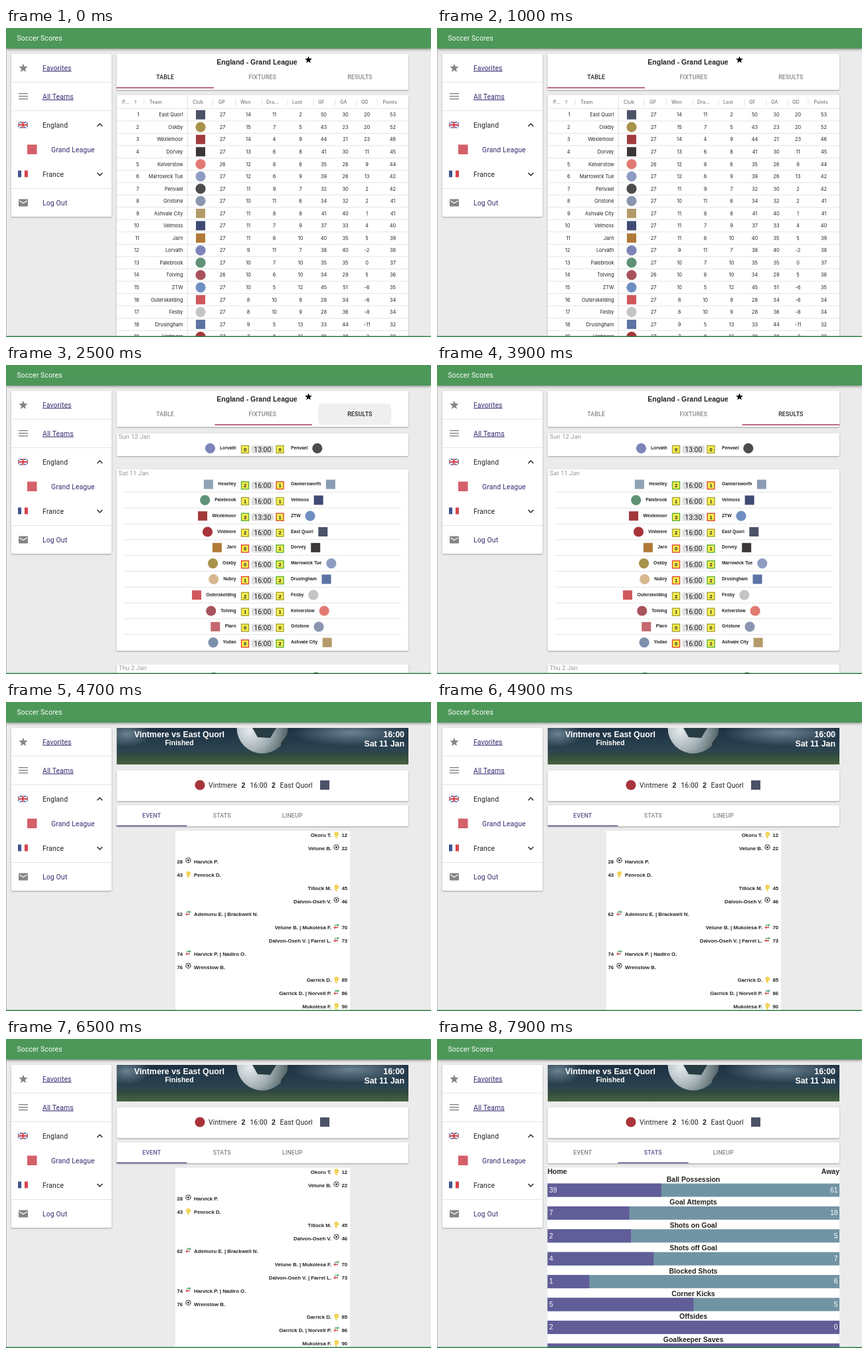
Recreate the animation shown at these times as an HTML page. Size 640 by 465 pixels, loop 8000 ms.

```html
<!DOCTYPE html>
<html lang="en">
<head>
<meta charset="utf-8">
<title>Soccer Scores</title>
<style>
  html, body { margin: 0; width: 100%; height: 100%; overflow: hidden; background: #ebebeb; }
  svg { display: block; width: 640px; height: 465px; }
  text { font: 10.4px Roboto, sans-serif; fill: #222; white-space: pre; }
  .card { fill: #fff; filter: drop-shadow(0 1px 1.2px rgba(0, 0, 0, .32)); }
  .menu { letter-spacing: .14px; }
  .link { fill: #352a70; }
  .under { text-decoration: underline; }
  .tab { font: 500 8.8px Roboto, sans-serif; letter-spacing: .22px; fill: #858585; }
  .cell { font: 7.4px Inter, sans-serif; }
  .head { font: 500 7.2px Inter, sans-serif; fill: #777; }
  .date { font-size: 9.6px; fill: #999; }
  .bold { font: bold 10.5px "Liberation Sans", Arial, sans-serif; }
  .team { font-size: 6.7px; }
  .score { font-size: 7.6px; }
  .event { font-size: 7.8px; }
  .banner { font-size: 12.4px; fill: #fff; }
  .num { font: 10.4px "Liberation Sans", Arial, sans-serif; fill: #fff; }
  .mid { text-anchor: middle; }
  .end { text-anchor: end; }
  .rule { stroke: #dedede; stroke-width: .8; }
  .icon { fill: #858585; }
  .chev { fill: none; stroke: #222; stroke-width: 1.4; }
</style>
</head>
<body>
<svg id="stage" viewBox="0 0 640 465"></svg>
<script>
const LOOP = 8000;
const LEAGUE = "Grand League";

// name, crest colour, square crest
const clubs = [
  ["East Quorl", "#4a5268", 1], ["Oskby", "#a8924a"], ["Wexlemoor", "#a23a3c", 1],
  ["Dorvey", "#3a3637", 1], ["Kelverstow", "#e27a72"], ["Marrowick Tue", "#8e9cc4"],
  ["Penvael", "#4c4c4c"], ["Gristone", "#8a96b0"], ["Ashvale City", "#b59a6a", 1],
  ["Velmoss", "#3f4a74", 1], ["Jarn", "#b07a38", 1], ["Lorvath", "#7d84b8"],
  ["Palebrook", "#5f9276"], ["Tolving", "#a8525c"], ["ZTW", "#6f8fc0"],
  ["Outerskelding", "#d0585c", 1], ["Fesby", "#c4c4c4"], ["Drusingham", "#5c74a4", 1],
  ["Vintmere", "#a8343a"], ["Hexelley", "#8fa3b4", 1], ["Gannersworth", "#8a9cb4", 1],
  ["Nubry", "#d8b890"], ["Plarn", "#c4686e", 1], ["Yodan", "#7c90ac"]
];

// played, won, drawn, lost, for, against, difference, points
const table = `27 14 11 2 50 30 20 53|27 15 7 5 43 23 20 52|27 14 4 9 44 21 23 46
27 13 6 8 41 30 11 45|26 12 8 6 35 26 9 44|27 12 6 9 39 26 13 42|27 11 9 7 32 30 2 42
27 10 11 6 34 32 2 41|27 11 8 8 41 40 1 41|27 11 7 9 37 33 4 40|27 11 6 10 40 35 5 39
27 9 11 7 38 40 -2 38|27 10 7 10 35 35 0 37|26 10 6 10 34 29 5 36|27 10 5 12 45 51 -6 35
27 8 10 9 28 34 -6 34|27 8 10 9 28 36 -8 34|27 9 5 13 33 44 -11 32|27 7 8 12 36 38 -2 30`
  .split(/[|\n]/).map(r => r.split(" "));

// home club, away club, goals, goals, time
const sunday = [[11, 6, 0, 0, "13:00"]];
const saturday = [
  [19, 20, 2, 1], [12, 9, 1, 1], [2, 14, 3, 1, "13:30"], [18, 0, 2, 2], [10, 3, 0, 1], [1, 5, 0, 2],
  [21, 17, 1, 2], [15, 16, 2, 2], [13, 4, 1, 1], [22, 7, 0, 0], [23, 8, 0, 2]
];

// minute, kind, player, side
const events = [
  [12, "card", "Okoru T.", 1], [22, "goal", "Velune B.", 1], [28, "goal", "Harvick P.", 0],
  [43, "card", "Penrock D.", 0], [45, "card", "Tillock M.", 1], [46, "goal", "Dalvon-Oseh V.", 1],
  [62, "swap", "Ademoru E. | Brackwell N.", 0], [70, "swap", "Velune B. | Mukolesa F.", 1],
  [73, "swap", "Dalvon-Oseh V. | Farrel L.", 1], [74, "swap", "Harvick P. | Nadiro O.", 0],
  [76, "goal", "Wrenstow B.", 0], [85, "card", "Garrick D.", 1],
  [86, "swap", "Garrick D. | Norvell P.", 1], [90, "card", "Mukolesa F.", 1]
];

const stats = [
  ["Ball Possession", 39, 61], ["Goal Attempts", 7, 18], ["Shots on Goal", 2, 5],
  ["Shots off Goal", 4, 7], ["Blocked Shots", 1, 6], ["Corner Kicks", 5, 5],
  ["Offsides", 2, 0], ["Goalkeeper Saves", 3, 0]
];

const text = (x, y, s, cls = "") => `<text x="${x}" y="${y}" class="${cls}">${s}</text>`;
const rect = (x, y, w, h, attrs = "") => `<rect x="${x}" y="${y}" width="${w}" height="${h}" ${attrs}/>`;
const circle = (x, y, r, attrs = "") => `<circle cx="${x}" cy="${y}" r="${r}" ${attrs}/>`;
const path = (d, attrs = "") => `<path d="${d}" ${attrs}/>`;
const line = (x1, y1, x2, y2) => `<line x1="${x1}" y1="${y1}" x2="${x2}" y2="${y2}" class="rule"/>`;
const card = (y, h, x = 166.5, w = 439.5) => rect(x, y, w, h, 'class="card" rx="2"');
const each = (list, f) => list.map(f).join("");

function crest(x, y, club) {
  const [, color, square] = clubs[club];
  return square ? rect(x - 7, y - 7, 14, 14, `fill="${color}"`) : circle(x, y, 7.6, `fill="${color}"`);
}

function star(x, y, r, attrs) {
  const pts = Array.from({ length: 10 }, (_, i) => {
    const a = i * Math.PI / 5, d = i % 2 ? r * .42 : r;
    return (x + d * Math.sin(a)).toFixed(2) + "," + (y - d * Math.cos(a)).toFixed(2);
  });
  return `<polygon points="${pts.join(" ")}" ${attrs}/>`;
}

const pen = document.createElement("canvas").getContext("2d");
pen.font = 'bold 6.7px "Liberation Sans", Arial, sans-serif';
const nameWidth = s => pen.measureText(s).width;

function appBar() {
  return rect(0, -6, 640, 37, 'fill="#4d9859" style="filter:drop-shadow(0 1px 2px rgba(0,0,0,.45))"')
    + text(16.5, 18.6, "Soccer Scores", "menu").replace("<text", '<text style="fill:#fff"');
}

function flagUK(x, y) {
  return rect(x, y, 15, 9.5, 'fill="#414f86"')
    + path(`M${x} ${y}l15 9.5m0 -9.5l-15 9.5`, 'stroke="#fff" stroke-width="1.8"')
    + path(`M${x} ${y + 4.75}h15M${x + 7.5} ${y}v9.5`, 'stroke="#fff" stroke-width="3.6"')
    + path(`M${x} ${y + 4.75}h15M${x + 7.5} ${y}v9.5`, 'stroke="#d0353f" stroke-width="2"');
}

function sideBar() {
  return card(39, 245, 8, 151)
    + each([81.5, 124.5, 241.5], y => line(8, y, 159, y))
    + star(26, 60.5, 7, 'class="icon"')
    + each([98, 102, 106], y => rect(19, y, 14, 1.4, 'class="icon"'))
    + flagUK(18, 141)
    + rect(32, 175.5, 14.5, 14.5, 'fill="#d4606a"')
    + each(["#3f5590", "#f4f4f4", "#d8434c"], (c, i) => rect(18 + i * 5, 214.5, 5, 10, `fill="${c}"`))
    + rect(19, 257.5, 14, 11, 'class="icon" rx="1.2"')
    + path("M20.2 260l5.8 3.6l5.8 -3.6", 'fill="none" stroke="#fff" stroke-width="1.2"')
    + path("M137.3 148l3.9 -3.9l3.9 3.9", 'class="chev"')
    + path("M137.3 218l3.9 3.9l3.9 -3.9", 'class="chev"')
    + text(55, 63.6, "Favorites", "menu link under")
    + text(55, 106.6, "All Teams", "menu link under")
    + text(55, 149.6, "England", "menu")
    + text(68, 186.6, LEAGUE, "menu link")
    + text(55, 223.6, "France", "menu")
    + text(55, 266.6, "Log Out", "menu link");
}

function leagueCard() {
  return card(39, 54)
    + text(378, 54.8, "England - " + LEAGUE, "bold mid")
    + star(455.5, 48, 5.6, 'fill="#000"')
    + `<clipPath id="tabClip">${rect(460, 58, 146, 32)}</clipPath>`
    + `<g clip-path="url(#tabClip)">${circle(525, 74, 0, 'id="ripple"')}</g>`
    + each(["TABLE", "FIXTURES", "RESULTS"], (s, i) =>
        text(239.7 + i * 146.6, 77.3, s, "tab mid").replace("<text", `<text id="league${i}"`))
    + rect(166.5, 89.2, 146.5, 1.5, 'id="leagueMark" fill="#a53a58"');
}

function tableView() {
  const heads = [["P...", 175], ["Team", 216], ["Club", 281], ["GP", 320], ["Won", 353], ["Dra...", 392],
    ["Lost", 431], ["GF", 470], ["GA", 503], ["GD", 535], ["Points", 567.5]];
  const cols = [326, 365, 404, 443.5, 478.5, 511, 543.5, 582.5];
  return card(101, 380)
    + each(heads, ([s, x]) => text(x, 114.3, s, "head"))
    + path("M195 114.5v-5.6m-2 2l2 -2l2 2", 'fill="none" stroke="#999" stroke-width=".8"')
    + each([208, 311.5, 345.5, 385, 424, 463, 496, 528, 559], x => line(x, 106, x, 117))
    + line(166.5, 121, 606, 121)
    + each(table, (row, i) => {
        const y = 130.6 + i * 18.55, base = y + 2.7;
        return line(166.5, y + 9.3, 606, y + 9.3)
          + text(200.5, base, i + 1, "cell end")
          + text(266.5, base, clubs[i][0], "cell end")
          + crest(293, y, i)
          + each(row, (v, k) => text(cols[k], base, v, "cell mid"));
      })
    + line(273.5, 101, 273.5, 465);
}

function scoreBox(x, y, mine, other) {
  const edge = mine > other ? "#58b034" : mine < other ? "#dc4a2c" : "#a9a238";
  return rect(x - 5.5, y - 5.5, 11, 11, `fill="#f7f04e" stroke="${edge}" stroke-width="1.4"`)
    + text(x, y + 2.8, mine, "bold score mid");
}

function fixture([home, away, a, b, time = "16:00"], y) {
  const [h, g] = [clubs[home][0], clubs[away][0]];
  return text(346.5, y + .6, h, "bold team end")
    + crest(346.5 - nameWidth(h) - 14.5, y - 1, home)
    + scoreBox(360, y + .6, a, b)
    + rect(369.5, y - 5.4, 33.5, 12, 'rx="3" fill="#dfdfdf"')
    + text(386.3, y + 4.4, time, "mid")
    + scoreBox(412.5, y + .6, b, a)
    + text(429, y + .6, g, "bold team")
    + crest(429 + nameWidth(g) + 14.5, y - 1, away);
}

function resultsView() {
  return card(103, 34) + text(169.5, 111.2, "Sun 12 Jan", "date")
    + each(sunday, f => fixture(f, 126.3))
    + card(157, 273) + text(169.5, 166, "Sat 11 Jan", "date")
    + each(saturday, (f, i) => {
        const y = 180.6 + i * 23.8;
        return fixture(f, y) + (i < 10 ? line(177, y + 10.8, 595, y + 10.8) : "");
      })
    + card(450.5, 40) + text(169.5, 458.6, "Thu 2 Jan", "date")
    + crest(313, 470, 11) + crest(467, 470, 6);
}

function matchHead() {
  const home = clubs[18][0], away = clubs[0][0];
  return `<defs>
      <linearGradient id="night" x2="0" y2="1"><stop stop-color="#1d3042"/><stop offset=".6" stop-color="#2b4350"/>
        <stop offset=".74" stop-color="#30493f"/><stop offset="1" stop-color="#46633f"/></linearGradient>
      <radialGradient id="glow"><stop stop-color="#9db6c4" stop-opacity=".6"/><stop offset="1" stop-color="#9db6c4" stop-opacity="0"/></radialGradient>
      <radialGradient id="ball" cx=".25" cy=".55" r=".8"><stop stop-color="#e6ebee"/><stop offset=".5" stop-color="#a4b1b6"/><stop offset="1" stop-color="#44565a"/></radialGradient>
      <clipPath id="photo">${rect(166.5, 39, 439.5, 55)}</clipPath>
    </defs><g clip-path="url(#photo)">`
    + rect(166.5, 39, 439.5, 55, 'fill="url(#night)"')
    + `<ellipse cx="182" cy="48" rx="36" ry="20" fill="url(#glow)"/><ellipse cx="520" cy="46" rx="90" ry="20" fill="url(#glow)"/>`
    + circle(386, 39, 38.5, 'fill="url(#ball)"')
    + path("M371 39l8 14l19 1l9 -15zM414 62l10 -14l-1 12l-8 10z", 'fill="#263b42"')
    + "</g>"
    + text(261, 52.6, home + " vs " + away, "bold banner mid")
    + text(261, 65, "Finished", "bold mid").replace("<text", '<text style="fill:#fff"')
    + text(600, 52.6, "16:00", "bold banner end")
    + text(600, 66.6, "Sat 11 Jan", "bold banner end")
    + card(103, 46)
    + crest(292, 125, 18) + crest(480, 125, 0)
    + text(348, 128.9, home, "menu end") + text(357.3, 128.9, 2, "bold mid")
    + text(380.5, 128.9, "16:00", "menu mid") + text(403, 128.9, 2, "bold mid")
    + text(412.5, 128.9, away, "menu")
    + card(155.5, 31.5)
    + each(["EVENT", "STATS", "LINEUP"], (s, i) =>
        text(219.3 + i * 106, 173.8, s, "tab mid").replace("<text", `<text id="match${i}"`))
    + rect(166.5, 185.6, 106, 1.5, 'id="matchMark" fill="#56558f"');
}

const signs = {
  card: (x, y) => path(`M${x - 3.5} ${y - 4}l4 -1.5l3.5 2.5l-1 4l-2.5 1l1 3l-3 -1z`, 'fill="#f1d45a"'),
  goal: (x, y) => circle(x, y - 2, 3.8, 'fill="#fff" stroke="#444" stroke-width=".9"')
    + circle(x, y - 2, 1.5, 'fill="#333"')
    + circle(x, y - 2, 3.3, 'fill="none" stroke="#333" stroke-width="1.1" stroke-dasharray="1.4 2.75"'),
  swap: (x, y) => path(`M${x - 2.5} ${y - 4.4}h4v-1.5l3 2.3l-3 2.3v-1.5h-4z`, 'fill="#5fae78"')
    + path(`M${x + 2.5} ${y - .8}h-4v-1.5l-3 2.3l3 2.3v-1.5h4z`, 'fill="#d0525a"')
};

function eventView() {
  return rect(255, 194, 263, 290, 'fill="#fff"')
    + each(events, ([min, kind, who, away], i) => {
        const y = 200.6 + i * 19.82, base = y + 2.8;
        return text(away ? 505.5 : 257.5, base, min, "bold event")
          + signs[kind](away ? 497.5 : 274.5, y)
          + text(away ? 490 : 283, base, who, away ? "bold event end" : "bold event");
      });
}

function statsView() {
  return rect(166.5, 193.5, 439.5, 290, 'fill="#fff"')
    + text(166.5, 203, "Home", "bold") + text(606, 203, "Away", "bold end")
    + each(stats, ([label, a, b], i) => {
        const y = 217.5 + i * 34.4;
        return text(386, y - 2.6, label, "bold mid")
          + rect(166.5, y, 439.5, 20, 'fill="#7194a4"')
          + rect(166.5, y, 439.5 * a / (a + b), 20, 'fill="#615d98"')
          + text(169, y + 13.2, a, "num") + text(603.5, y + 13.2, b, "num end");
      });
}

const group = (id, body) => `<g id="${id}">${body}</g>`;
document.getElementById("stage").innerHTML = rect(0, 0, 640, 465, 'fill="#ebebeb"')
  + group("page", appBar() + sideBar()
    + group("league", leagueCard() + group("table", tableView()) + group("results", resultsView()))
    + group("match", matchHead() + group("events", eventView()) + group("stats", statsView())))
  + rect(0, 31, .8, 434, 'fill="#aaa"')
  + rect(0, 463.5, 640, 1.5, 'fill="#2f8040"');

const $ = id => document.getElementById(id);
const show = (id, on) => { $(id).style.display = on ? "" : "none"; };
const ease = k => k * k * (3 - 2 * k);
const ramp = (t, a, b) => ease(Math.min(1, Math.max(0, (t - a) / (b - a))));

const RESULTS_AT = 2350, MATCH_AT = 4500, STATS_AT = 7300;

function draw(t) {
  const inMatch = t >= MATCH_AT, inResults = t >= RESULTS_AT, inStats = t >= STATS_AT;
  show("league", !inMatch);
  show("match", inMatch);
  show("table", !inResults);
  show("results", inResults);
  show("events", !inStats);
  show("stats", inStats);

  $("leagueMark").setAttribute("x", 166.5 + 293 * ramp(t, RESULTS_AT, RESULTS_AT + 300));
  $("matchMark").setAttribute("x", 166.5 + 106 * ramp(t, STATS_AT, STATS_AT + 300));
  $("league0").style.fill = inResults ? "" : "#222";
  $("league2").style.fill = inResults ? "#222" : "";
  $("match0").style.fill = inStats ? "" : "#56558f";
  $("match1").style.fill = inStats ? "#56558f" : "";

  const ripple = $("ripple");
  ripple.setAttribute("r", Math.max(0, (t - 2050) * .123));
  ripple.setAttribute("fill-opacity", .13 * (1 - ramp(t, 2350, 2650)));

  const scroll = 4.5 * (ramp(t, 5600, 5900) - ramp(t, 6200, 6450));
  $("page").setAttribute("transform", `translate(0 ${-scroll})`);
}

const start = performance.now();
function tick() {
  draw((performance.now() - start) % LOOP);
  requestAnimationFrame(tick);
}
tick();
</script>
</body>
</html>
```
